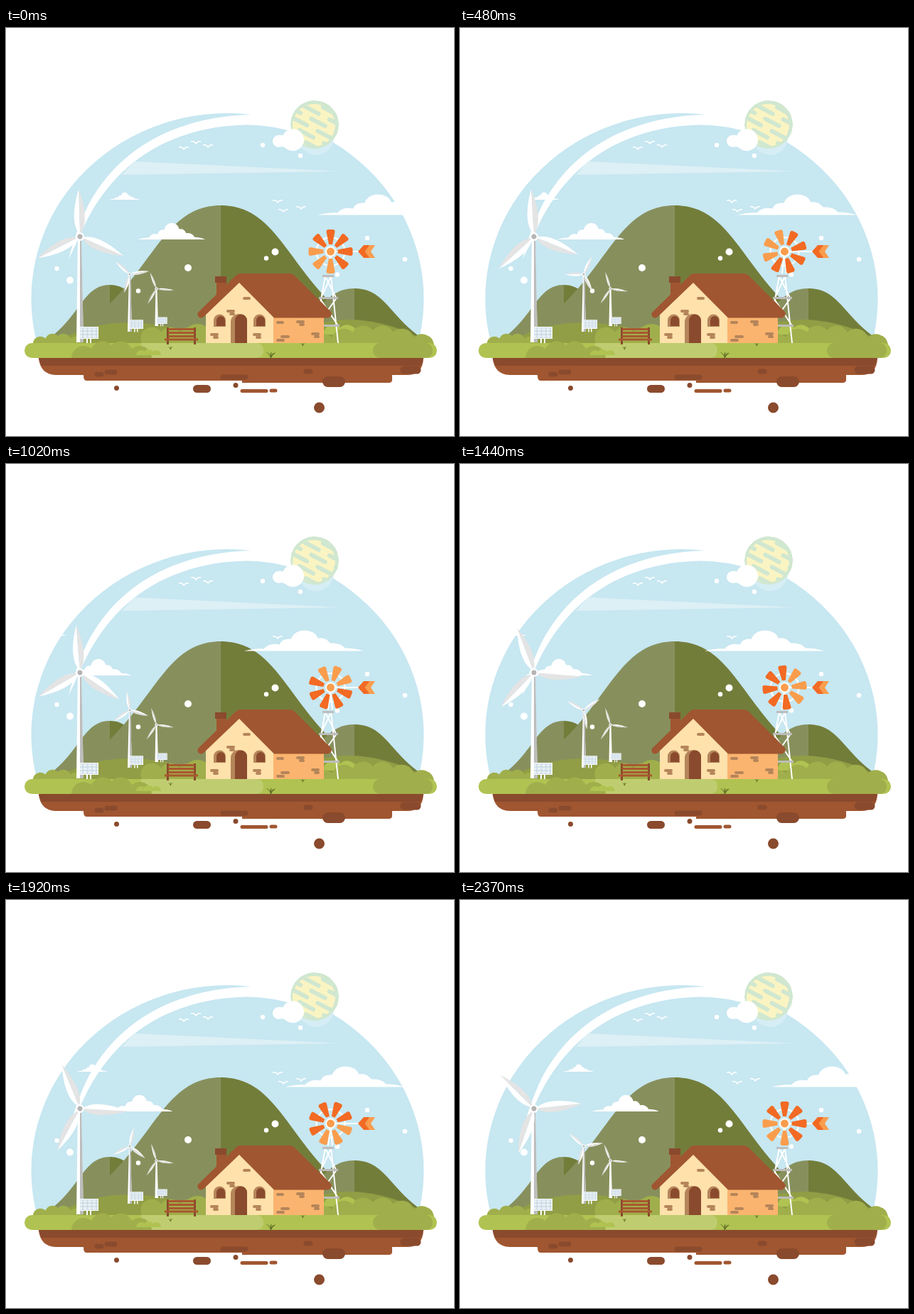
Recreate the animation shown at these times as an HTML page. Size 630 by 575 pixels, loop 2400 ms.

```html
<!DOCTYPE html>
<html lang="en">
<head>
<meta charset="utf-8">
<title>Green energy farm</title>
<style>
html, body { margin: 0; width: 100%; height: 100%; overflow: hidden; background: #fff; }
svg { display: block; }
.soil { fill: #a05630; }
.dark { fill: #8a4a2d; }
.hill { fill: #919e45; }
.bush { fill: #a0af4b; }
.lawn { fill: #b0c352; }
.brick { fill: #b5855a; }
.white { fill: #fff; }
.grey { fill: #bdbdbd; }
.line { fill: none; stroke: #fff; stroke-width: 2; }
.round { fill: none; stroke: #8a4a2d; stroke-linecap: round; }
.speck { stroke: #fff; }
</style>
</head>
<body>
<svg width="630" height="575" viewBox="0 0 630 575">
<defs>
  <path id="cloud" fill="#fff" d="M0 0Q18-4 28-3Q36-12 50-9Q53-18 66-17Q71-29 86-29Q100-28 104-18Q115-20 121-11Q136-12 142-4Q156-4 168 0Z"/>
  <path id="bird" fill="none" stroke="#fff" stroke-width="1.4" d="M-7-1Q-2-2 0 2Q3-2 7-1"/>
  <path id="slope" d="M0 0C86 0 95 104 200 175V190H0Z"/>
  <g id="mountain">
    <use href="#slope" fill="#87905d" transform="scale(-1 1)"/>
    <use href="#slope" fill="#737d3a"/>
  </g>
  <g id="blade">
    <path class="white" d="M3 0C16-11 40-9 67 0Z"/>
    <path fill="#e4e4e4" d="M3 0C16 11 40 9 67 0Z"/>
  </g>
  <pattern id="cells" width="6.25" height="5" patternUnits="userSpaceOnUse">
    <path fill="#e9f1f6" stroke="#bfd0dd" d="M0 0H6.250V5H0Z"/>
  </pattern>
  <g id="panel">
    <path class="white" d="M11 15h2v7h-2zM16 15h2v7h-2zM1-1H28V16H1Z"/>
    <path fill="url(#cells)" d="M2 0H27V15H2Z"/>
  </g>
  <path id="tuft" fill="#66752a" d="M0 5Q-1-1-6-4Q-3-4-1 0Q0-3 1-5Q2-3 1 0Q4-4 7-3Q2 0 1 5Z"/>
  <g id="window">
    <path class="brick" d="M0 17V8A8 8 0 0 1 17 8V17Z"/>
    <path class="dark" d="M4 16V8A6 6 0 0 1 16 8V16Z"/>
  </g>
  <path id="bricks" fill="none" stroke="#b5855a" stroke-width="4" stroke-linecap="round" d="M2 2h8M6 6h4"/>
  <clipPath id="disc"><circle r="34"/></clipPath>
</defs>

<!-- sky -->
<path fill="#c7e7f1" d="M44 446A276 261.5 0 1 1 579 446Z"/>
<path class="white" d="M369 122C255 119 165 160 117 247C103 275 95 300 88 326C95 312 102 296 107 285C148 194 225 139 338 136.500C375 137 402 145 425 153L430 140L400 125Z"/>
<path fill="#ddf0f5" d="M180 188L472 202L163 207Z"/>
<circle fill="#d5edf4" cx="436" cy="154" r="25"/>
<g transform="translate(434 136)" clip-path="url(#disc)">
  <circle fill="#d0e7d0" r="34"/>
  <circle fill="#faf4c3" cx="-1" cy="1" r="30"/>
  <g id="streaks" stroke="#d0e7d0" stroke-width="6" stroke-linecap="round" stroke-dasharray="22 17" transform="rotate(28)"></g>
</g>
<path class="white" d="M383 151Q387 150 389 152A15.500 15.500 0 1 1 394 170Q390 166 384 168A8.500 8.500 0 0 1 383 151Z"/>

<!-- mountains -->
<use href="#mountain" transform="translate(146 362) scale(.44)"/>
<use href="#mountain" transform="translate(302 250)"/>
<use href="#mountain" transform="translate(490 367) scale(.53 .44)"/>
<use href="#bird" x="267" y="161"/><use href="#bird" x="250" y="169"/><use href="#bird" x="284" y="166"/>
<use href="#bird" x="382" y="244"/><use href="#bird" x="390" y="257"/><use href="#bird" x="415" y="253"/>
<g id="clouds">
  <use href="#cloud" transform="translate(145 242) scale(.256 .36)"/>
  <use href="#cloud" transform="translate(185 298) scale(.565 .8)"/>
  <use href="#cloud" transform="translate(438 263.500)"/>
</g>
<path class="round speck" stroke-width="10" d="M256 338h0M378.500 315.500h0M90 355.500h0"/>
<path class="round speck" stroke-width="6.500" d="M361 165h0M414 180h0M366 324.500h0M186 370.500h0M71.500 339h0M508 296h0M561 326h0M466 347.500h0"/>

<!-- hills and bushes -->
<path class="hill" d="M66 446Q110 415 175 415Q240 416 300 446Z"/>
<path class="hill" d="M430 446V420Q470 406 515 414Q560 422 598 446Z"/>
<g id="backBushes"></g>

<!-- wind turbines -->
<path class="white" d="M101 294H106L109 443H99Z"/><path class="grey" d="M104 294H106L109 443H104Z"/>
<path class="white" d="M173 347H175L177 428H171Z"/><path class="grey" d="M174 347H175L177 428H174Z"/>
<path class="white" d="M210.500 367H212.500L214 420H209.500Z"/>
<g id="far"></g><g id="middle"></g><g id="near"></g>

<!-- wind pump -->
<path class="line" d="M449 349L432 444M457 349L467 444M450 352L464 380M456 352L443 380M442 382L466 418M464 382L438 418"/>
<path class="grey" d="M445 348H461V351H445ZM440 379H467V382H440ZM437 418H469V421H437Z"/>
<path class="line" d="M453 346L456 318L459 346M456 315H503"/>
<path fill="#f26a23" d="M495 315L503 306H512L505 315L512 324H503Z"/>
<path fill="#f99d4d" d="M505 315L511 306H519L513 315L519 324H511Z"/>
<g id="wheel"></g>

<!-- ground -->
<rect class="lawn" x="26" y="444" width="580" height="21" rx="10.500"/>
<path fill="#bfcd70" d="M190 444H352Q362 445 362 454Q362 465 350 465H190Z"/>
<rect class="bush" x="516" y="444" width="84" height="21" rx="10"/>
<g id="frontBushes"></g>
<path class="soil" d="M46 465H587Q586 489 564 489H543V496Q543 500 538 500H332V497H113Q109 497 109 489H70Q48 488 46 465Z"/>
<path class="dark" d="M46 465H587Q586 472 583 476H50Q47 472 46 465Z"/>
<path class="round" stroke-width="7" d="M142 485h11M128 488h6M305 492h32M422 484h6M155.500 507.500h0M323 503.500h0"/>
<path class="round" stroke-width="11" d="M560 482h18M268.500 508.500h14"/>
<path class="round" stroke-width="15" d="M452.500 498.500h17M440.500 535h0"/>
<path class="round" stroke-width="5" style="stroke: #a05630" d="M332 511.500h34M373 511h6"/>
<use href="#tuft" x="372" y="461"/>
<use href="#tuft" transform="translate(417 446) scale(.5)"/>
<use href="#tuft" transform="translate(231 451) scale(.5)"/>
<use href="#panel" x="102" y="422"/>
<use href="#panel" transform="translate(172 412) scale(.75)"/>
<use href="#panel" transform="translate(211 408) scale(.56)"/>

<!-- bench -->
<path class="dark" d="M226 422H229V446H226ZM264 422H267V446H264Z"/>
<path stroke="#a9582f" stroke-width="3" d="M228 424.500H265M228 429.500H265M228 434.500H265M223 439H270"/>

<!-- house -->
<path class="soil" d="M296 356H310V380H296Z"/><path class="dark" d="M294 350H310V359H294Z"/>
<path fill="#fee1ab" d="M281 444V396L328 355L377 402V444Z"/>
<path fill="#fbb46f" d="M376 400H447V444H376Z"/>
<path class="soil" d="M329 346H399Q403 346 406 349L457 400Q460 405 453 408.500H377L328 359L278 407Q273 411 270 406Q268 402 272 399L323 349Q326 346 329 346Z"/>
<use href="#window" x="292" y="404"/><use href="#window" x="348" y="404"/>
<path class="brick" d="M316 444V414A11.500 11 0 0 1 339 414V444Z"/>
<path class="dark" d="M322 444V412A8.500 8.500 0 0 1 339 412V444Z"/>
<use href="#bricks" x="310" y="397"/><use href="#bricks" x="287" y="430"/><use href="#bricks" x="347" y="430"/>
<use href="#bricks" x="408" y="412"/><use href="#bricks" x="429" y="429"/>
<path class="round" style="stroke: #b5855a" stroke-width="4" d="M335 381h7M382 415h7M388 435h9M382 440h8"/>
</svg>
<script>
const $ = id => document.getElementById(id);
const repeat = (count, make) => Array.from({ length: count }, (_, i) => make(i)).join('');

// A row of round bumps whose joints follow a sine arch.
function bush(left, right, base, height, bumps, kind = 'bush') {
  const width = (right - left) / bumps;
  const arcs = repeat(bumps, i => {
    const y = base - height * Math.sin(Math.PI * (i + 1) / bumps);
    return `A${width * .6} ${width * .6} 0 0 1 ${left + width * (i + 1)} ${y}`;
  });
  return `<path class="${kind}" d="M${left} ${base}${arcs}Z"/>`;
}

function rotor(id, thickness) {
  $(id).innerHTML = [0, 129, 244.5].map(angle =>
    `<use href="#blade" transform="rotate(${angle}) scale(1 ${thickness})"/>`).join('') +
    '<circle class="white" r="6"/><circle fill="#b5b5b5" r="3.5"/>';
}

$('streaks').innerHTML = repeat(6, i =>
  `<path stroke-dashoffset="${i * 23}" d="M-40 ${i * 11 - 27}H40"/>`);
$('backBushes').innerHTML = bush(38, 108, 446, 12, 4) + bush(192, 270, 446, 20, 3) +
  bush(250, 320, 446, 22, 2) + bush(446, 494, 432, 10, 2, 'lawn') + bush(430, 602, 446, 20, 6);
$('frontBushes').innerHTML = bush(92, 205, 465, 18, 4) + bush(183, 218, 461, 6, 3, 'lawn');
$('wheel').innerHTML = '<circle class="line" r="20"/>' + repeat(8, i =>
  `<path fill="${i < 5 ? '#f26a23' : '#f99d4d'}" transform="rotate(${i * 45 - 135})"
    d="M10-2.5L28-6Q31-6 31-3V3Q31 6 28 6L10 2.5Z"/>`) +
  '<circle class="white" r="7.5"/><circle fill="#f99d4d" r="5.5"/>';
rotor('near', 1);
rotor('middle', .8);
rotor('far', .55);

const STEP = 30, STEPS = 80, LAST = STEPS - 1;
const place = (id, x, y, angle, scale = 1) =>
  $(id).setAttribute('transform', `translate(${x} ${y}) rotate(${angle}) scale(${scale})`);

function draw() {
  const step = Math.floor(performance.now() / STEP) % STEPS;
  const drift = 120 * (1 - Math.abs(1 - 2 * step / LAST));
  const turn = 360 * step / LAST;
  place('clouds', -drift, 0, 0);
  place('near', 104, 294, 24 + 7.1 * step);
  place('middle', 174, 347, 222 + turn, .41);
  place('far', 211.5, 367.5, 120 + Math.min(4, drift / 12), .37);
  place('wheel', 456.5, 315, turn);
  requestAnimationFrame(draw);
}
draw();
</script>
</body>
</html>
```
